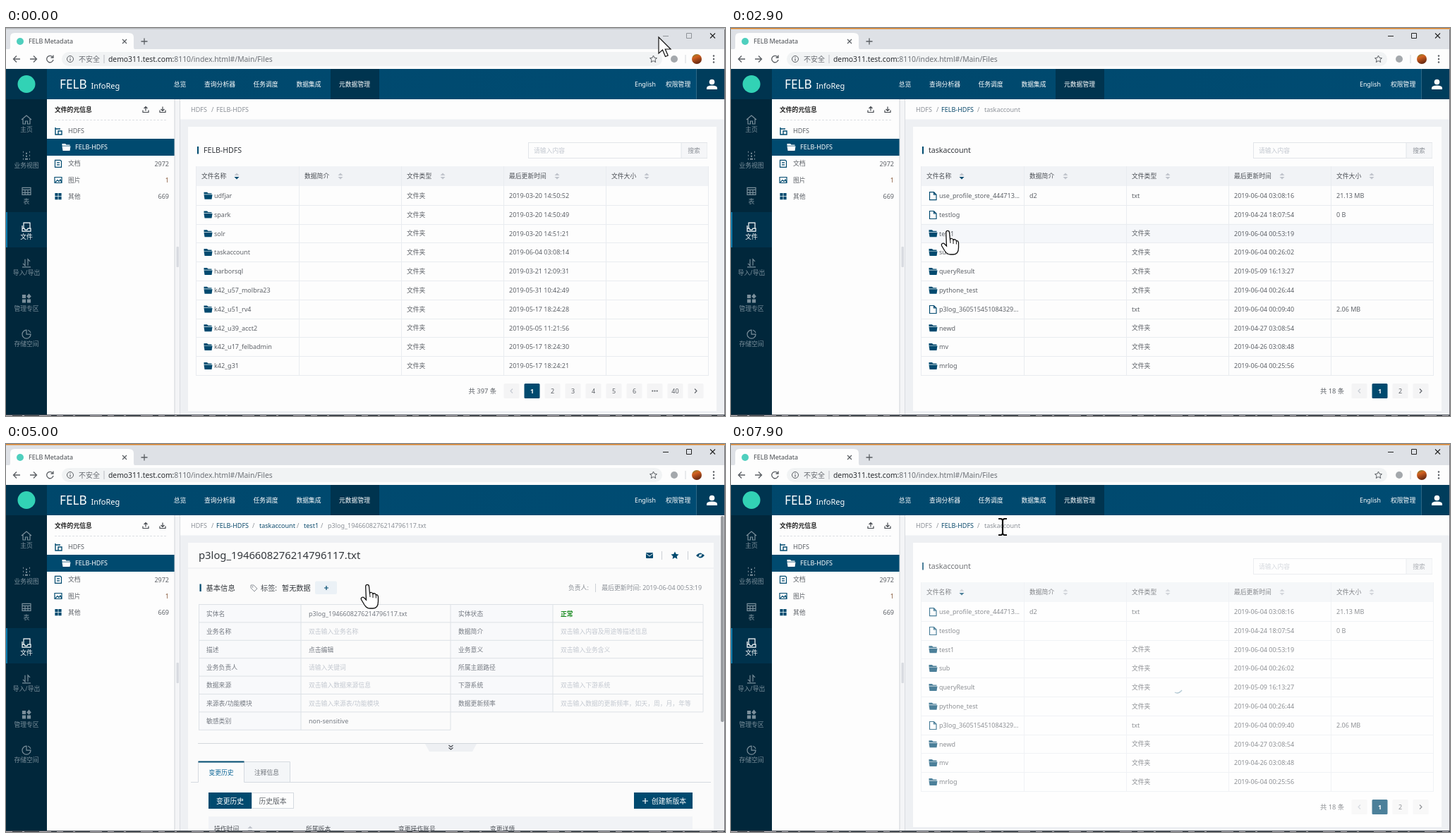
These frames come from a looping animation (1019x550 px, 8 s). An HTML page:

```html
<!DOCTYPE html>
<html lang="zh-CN">
<head>
<meta charset="utf-8">
<title>File metadata browser</title>
<style>
html, body { margin: 0; width: 100%; height: 100%; overflow: hidden; background: #fff; }
svg { display: block; width: 1019px; height: 550px; }
text { font-family: "Noto Sans", "Noto Sans CJK SC", "Noto Sans CJK", sans-serif; white-space: pre; }
</style>
</head>
<body>
<svg id="stage" viewBox="0 0 1019 550"></svg>
<script>
const NAVY = '#004a6f', INK = '#5d6167', GREY = '#8b9097', PALE = '#c3c8d0', LINE = '#e9ecf0', PAPER = '#fdfdfd', CARD = '#fbfbfb';
const FILE = 'p3log_1946608276214796117.txt';

// Drawing helpers: every text is placed by its vertical centre.
const rect = (x, y, w, h, fill, extra = '') => `<rect x="${x}" y="${y}" width="${w}" height="${h}" fill="${fill}" ${extra}/>`;
const path = (d, stroke, width = 1, fill = 'none', extra = '') =>
  `<path d="${d}" stroke="${stroke}" stroke-width="${width}" fill="${fill}" ${extra}/>`;
const solid = (d, fill) => `<path d="${d}" fill="${fill}"/>`;
const disc = (x, y, r, fill) => `<circle cx="${x}" cy="${y}" r="${r}" fill="${fill}"/>`;
const at = (x, y, body) => `<g transform="translate(${x} ${y})">${body}</g>`;
const text = (x, cy, str, fill = INK, { size, anchor = 'start', weight = 400, id = '' } = {}) => {
  const s = size || (/[\u4e00-\u9fff]/.test(str) ? 8.8 : 9);
  return `<text ${id && `id="${id}"`} x="${x}" y="${cy + s * 0.36}" font-size="${s}" fill="${fill}" text-anchor="${anchor}" font-weight="${weight}">${str}</text>`;
};
const mid = (x, cy, str, fill, opts) => text(x, cy, str, fill, { anchor: 'middle', ...opts });

const folder = (x, y, fill) => at(x, y, solid('M0-5H4.5L6-3.5H11V-2.2H0ZM0-1.5H12L11 5H1Z', fill));
const page = (x, y) => at(x, y, path('M.5-5H6.5L10-1.500V6H.5ZM6.5-5V-1.500H10', NAVY, 1.2));
const sorter = (x, y, active) => at(x, y,
  solid('M-3.5-1L0-4.5L3.5-1Z', '#c0c4cc') + solid('M-3.5 1L0 4.5L3.5 1Z', active ? NAVY : '#c0c4cc'));

function browser() {
  const dark = '#5a5e63';
  return rect(0, 0, 1019, 31, '#dee1e6')
    + solid('M2 31Q6 31 6 27V13Q6 7 12 7H174Q181 7 181 13V27Q181 31 185 31Z', PAPER)
    + disc(20, 19, 5, '#4fcfbe') + text(32, 19, 'FELB Metadata', '#45494e')
    + path('M165 16L171 22M171 16L165 22', dark, 1.2) + path('M191.500 19H200.500M196 14.500V23.500', dark, 1.3)
    + rect(0, 30, 1019, 28, PAPER)
    + path('M20 44H11M15 39.500L10.500 44L15 48.500', dark, 1.3)
    + path('M34 44H43M39 39.500L43.500 44L39 48.500', dark, 1.3)
    + path('M66 41A4.700 4.700 0 1 0 67 45M67 38.500V42H63.500', dark, 1.3)
    + rect(79, 34, 851, 20, '#f1f3f4', 'rx="10"')
    + `<circle cx="91" cy="44" r="4.5" fill="none" stroke="${dark}"/>` + path('M91 43.500V46.500M91 41.300V42.300', dark, 1.2)
    + text(103, 44, '不安全', '#666a70', { size: 10 }) + rect(138.500, 38, 1, 12, '#b9bdc2')
    + text(145, 44, 'demo311.test.com:<tspan fill="#6c7076">8110/index.html#/Main/Files</tspan>', '#2b2e32', { size: 10.35 })
    + at(917.500, 44, path('M0-5L1.500-1.700L5-1.300L2.400 1L3.200 4.500L0 2.600L-3.200 4.500L-2.400 1L-5-1.300L-1.500-1.700Z', dark))
    + disc(947, 44, 5, '#a4a8ac') + rect(962.500, 38, 1, 12, '#d4d7db')
    + disc(979, 44, 7, 'url(#avatar)') + [39.5, 44, 48.5].map(y => disc(1003, y, 1.2, dark)).join('')
    + `<g id="controls">${path('M931 11.500H939M964.500 7.500H971.500V14.500H964.500Z', 'currentColor')}</g>`
    + path('M998 7.500L1005 14.500M1005 7.500L998 14.500', '#222', 1.1)
    + '<rect id="edge" width="1019" height="1.5"/>';
}

function header() {
  const nav = [[246.5, '总览'], [303, '查询分析器'], [368, '任务调度'], [429, '数据集成'], [494, '元数据管理']];
  return rect(0, 58, 1019, 43, 'url(#bar)') + rect(0, 58, 58, 43, '#00344f') + rect(460, 58, 69, 43, '#00344f')
    + disc(29, 79.5, 12.5, '#32d2b5')
    + text(76, 79.5, 'FELB', '#fff', { size: 17.2 }) + text(120.5, 82, 'InfoReg', '#fff', { size: 11 })
    + nav.map(([x, s]) => mid(x, 80, s, '#fff', { weight: 500 })).join('')
    + text(891, 80, 'English', '#fff', { size: 8.8 }) + text(935, 80, '权限管理', '#fff', { weight: 500 })
    + rect(978, 58, 41, 43, '#003d5c') + rect(978, 58, 1, 43, '#2c6887')
    + disc(1000.500, 76.500, 3.800, '#fff') + solid('M993 87V85Q993 81.500 1000.500 81.500T1008 85V87Z', '#fff');
}

function sidebar() {
  const items = [
    ['主页', 'M-7 0L0-6L7 0M-5-1V6H-1.500V2H1.500V6H5V-1'],
    ['业务视图', 'M-5-5H-4M4-5H5M-1-3H1M-5 0H-4M4 0H5M-1 1H1M-5 5H-4M4 5H5M-2 5H2'],
    ['表', 'M-6-5H6V5H-6ZM-6-2H6M-6 2H6M-2-2V5M2-2V5'],
    ['文件', 'M-4 2V-6H5V2M-6-2V6H6V2H2L1 4H-2L-3 2H-6'],
    ['导入/导出', 'M-2-5V4L-5 1M2 4V-5L5-2M-6 6H6'],
    ['管理专区', 'M-5.500-5H-1.500V-1H-5.500ZM-5.500 1.500H-1.500V5.500H-5.500ZM1.500 1.500H5.500V5.500H1.500ZM3.500-6L6-3L3.500-.500L1-3Z'],
    ['存储空间', 'M0-6A6 6 0 1 0 6 0H0ZM2-6A6 6 0 0 1 6-2']
  ];
  return rect(0, 101, 58, 447, '#01273b') + rect(0, 261, 58, 50, '#00324c') + rect(0, 261, 2, 50, '#0a76a8')
    + items.map(([name, icon], i) => {
      const color = i === 3 ? '#fff' : '#7b8f9b', y = 130 + i * 50.7;
      return at(29, y, path(icon, color, i === 1 ? 2 : 1.2, i === 5 ? color : 'none')) + mid(29, y + 14, name, color);
    }).join('');
}

function tree() {
  const kinds = [
    ['文档', '2972', 'M-4.500-5H3L4.500-3.500V5H-4.500ZM-2-1.500H2M-2 1.500H2'],
    ['图片', '1', 'M-5-4H5V4H-5ZM-4 3L-1 0L1 2L3-.500L4.500 3'],
    ['其他', '669', 'M-4-4H-1V-1H-4ZM1-4H4V-1H1ZM-4 1H-1V4H-4ZM1 1H4V4H1Z']
  ];
  return rect(58, 101, 181, 447, PAPER) + text(69, 116, '文件的元信息', '#222', { weight: 700 })
    + at(198, 115.500, path('M-4 1V4H4V1M0 2V-4M-2.500-1.500L0-4L2.500-1.500', '#44484e', 1.200))
    + at(222, 115.500, path('M-4 1V4H4V1M0-4V2M-2.500-.500L0 2L2.500-.500', '#44484e', 1.200))
    + path('M69 130.500H228', '#dcdfe3', 1, 'none', 'stroke-dasharray="3 2"')
    + at(74, 146, path('M-4-5V5H5V0H0V5M-4-3H3', NAVY, 1.4)) + text(88, 146, 'HDFS')
    + rect(58, 157, 181, 24, NAVY) + folder(79.5, 169, '#fff') + text(98, 169, 'FELB-HDFS', '#fff', { weight: 500 })
    + kinds.map(([name, count, icon], i) => {
      const y = 192.3 + i * 23.2;
      return at(74, y, path(icon, NAVY, 1.2, i === 2 ? NAVY : 'none')) + text(88, y, name)
        + text(231, y, count, i === 1 ? '#86583a' : INK, { anchor: 'end' });
    }).join('')
    + rect(239, 101, 8, 447, '#f4f5f7') + rect(238.500, 101, 1, 447, '#cfd3d8') + rect(246, 101, 1, 447, '#d9dce0')
    + rect(241.5, 310, 3.5, 29, '#d8dbe0', 'rx="1"');
}

function crumbs(names) {
  const xs = [262, 298, 359, 422, 456];
  return rect(247, 101, 771, 28.500, PAPER) + names.map((name, i) =>
    text(xs[i], 116, name, i && i < names.length - 1 ? '#0b4a6c' : GREY)
    + (i ? text([0, 291, 349, 412, 446][i], 116, '/', GREY) : '')).join('');
}

const COLUMNS = [269.5, 415.5, 560.5, 705.5, 850.5, 995.5], TOP = 224, ROW = 26.8;

// '<' and '>' are drawn as chevrons, a bar of dots stands for skipped pages.
function pager(total, labels, cy, id) {
  const first = 967 - (labels.length - 1) * 29;
  const glyph = (label, x) => ({
    '<': at(x, cy, path('M1.500-3L-1.500 0L1.500 3', PALE, 1.1)),
    '>': at(x, cy, path('M-1.500-3L1.500 0L-1.500 3', labels.length > 3 ? INK : PALE, 1.1)),
    '...': [-3.2, 0, 3.2].map(dx => disc(x + dx, cy, 1.1, INK)).join('')
  })[label] || mid(x, cy, label, label === '1' ? '#fff' : INK, { weight: label === '1' ? 700 : 400 });
  return text(first - 11, cy, `共 ${total} 条`, INK, { size: 9.3, anchor: 'end', id })
    + labels.map((label, i) => {
      const x = first + i * 29;
      return rect(x - 0.5, cy - 10.5, 22, 21, label === '1' ? NAVY : '#f4f4f5', 'rx="1.5"') + glyph(label, x + 10.5);
    }).join('');
}

// Row: [name, time, type, size, note]; the type defaults to a folder.
function list(id, { names, rows, total, pages, countId, cardEnd, border = LINE, card = PAPER }) {
  const heads = [['文件名称', 277, 327], ['数据简介', 423, 474], ['文件类型', 568, 619], ['最后更新时间', 713, 781], ['文件大小', 858, 908]];
  const end = TOP + ROW * rows.length;
  const grid = COLUMNS.map(x => `M${x} 196V${end}`).join('')
    + rows.map((_, i) => `M269 ${Math.round(TOP + ROW * (i + 1)) + 0.5}H996`).join('');
  return `<g id="${id}">` + crumbs(names) + rect(258, 140, 749, cardEnd - 140, card)
    + rect(271, 168, 2, 10.500, NAVY) + text(280, 173, names[names.length - 1], '#33373c', { size: 10.6 })
    + rect(740.5, 162.5, 253, 22, card, 'stroke="#e2e5e9"') + rect(957, 163, 36.5, 21, '#f5f6f8') + rect(956.5, 162.5, 1, 22, '#e2e5e9')
    + text(748, 173.500, '请输入内容', PALE) + mid(975, 173.500, '搜索', GREY)
    + rect(269, 196, 727, 28, '#f1f3f6')
    + `<rect class="hover" x="269" width="727" height="${ROW}" fill="#f5f7fa"/>`
    + path(grid, border)
    + heads.map(([s, x, sx], i) => text(x, 210, s, '#4c5056', { weight: 500 }) + sorter(sx, 210, !i)).join('')
    + rows.map(([name, time, type = '文件夹', size = '', note = ''], i) => {
      const y = TOP + ROW * i + 13.7;
      return (type === '文件夹' ? folder(280.500, y, NAVY) : page(281, y)) + text(295, y, name)
        + text(423, y, note) + text(568, y, type) + text(713, y, time) + text(858, y, size);
    }).join('')
    + pager(total, pages, rows.length > 2 ? 514.5 : 300, countId) + '</g>';
}

function detail() {
  const fields = [
    ['实体名', FILE, '实体状态', '正常'],
    ['业务名称', '双击输入业务名称', '数据简介', '双击输入内容及用途等描述信息'],
    ['描述', '点击编辑', '业务意义', '双击输入业务含义'],
    ['业务负责人', '请输入关键词', '所属主题路径', ''],
    ['数据来源', '双击输入数据来源信息', '下游系统', '双击输入下游系统'],
    ['来源表/功能模块', '双击输入来源表/功能模块', '数据更新频率', '双击输入数据的更新频率，如天，周，月，年等'],
    ['敏感类别', 'non-sensitive']
  ];
  const xs = [284, 429, 641, 786], step = 25.4, y0 = 227.5;
  const tone = s => s === '正常' ? '#15881c' : /^(双击|请输入)/.test(s) ? PALE : '#757a82';
  const cell = (s, c, r) => text(xs[c], y0 + step * (r + 0.52), s, tone(s), { weight: s === '正常' ? 700 : 400 });
  const lines = fields.map((_, r) => `M273 ${y0 + step * r}H988`).join('')
    + `M273 ${y0 + step * 7}H630M273.500 ${y0}V${y0 + step * 7}M418 ${y0}V${y0 + step * 7}M630 ${y0}V${y0 + step * 7}`
    + `M775 ${y0}V${y0 + step * 6}M988 ${y0}V${y0 + step * 6}`;
  return '<g id="detail">' + crumbs(['HDFS', 'FELB-HDFS', 'taskaccount', 'test1', FILE])
    + rect(258, 140, 745, 408, CARD) + text(273, 158, FILE, '#33373c', { size: 14.8 }) + rect(258, 175.5, 745, 1, LINE)
    + at(912, 158, rect(-5, -4, 10, 8, NAVY, 'rx="1"') + path('M-4.500-2.500L0 1L4.500-2.500', '#fff'))
    + at(948, 158, solid('M0-5.500L1.700-1.900L5.500-1.500L2.700 1.200L3.400 5L0 3.100L-3.400 5L-2.700 1.200L-5.500-1.500L-1.700-1.900Z', NAVY))
    + at(984, 158, solid('M-6 0Q0-7 6 0Q0 7-6 0Z', NAVY) + disc(0, 0, 1.8, '#fff') + path('M-5 4L5-4', '#fff'))
    + rect(929, 152, 1, 12, '#ccd1d6') + rect(966, 152, 1, 12, '#ccd1d6')
    + rect(274.500, 198.500, 2.200, 10.500, NAVY) + text(283.500, 204, '基本信息', '#33373c', { size: 10.3, weight: 500 })
    + at(351, 204, path('M-4-4H0L5 1L1 5L-4 0Z', GREY) + disc(-1.500, -1.500, 0.9, GREY))
    + text(361, 204, '标签:', '#4c5056', { size: 10.2 }) + text(391, 204, '暂无数据', '#33373c', { size: 10.2 })
    + rect(438, 194.5, 31, 18.5, '#ebf1f6', 'rx="2"') + path('M451 204H457M454 201V207', NAVY, 1.2)
    + text(797, 204, '负责人:', GREY) + rect(835, 198, 1, 12, '#ccd1d6')
    + text(986, 204, '最后更新时间: 2019-06-04 00:53:19', GREY, { anchor: 'end', size: 8.9 })
    + rect(273, y0, 145, step * 7, '#f8f9fb') + rect(630, y0, 145, step * 6, '#f8f9fb')
    + path(lines, '#dde1e6') + fields.map((row, r) => row.map((s, c) => cell(s, c, r)).join('')).join('')
    + path('M272 424.500H988', '#d3d7dc') + solid('M594 425H667L661 436H600Z', '#eef0f3')
    + path('M627.500 427L630.500 429.500L633.500 427M627.500 430.500L630.500 433L633.500 430.500', '#44484e', 1.100)
    + rect(337, 450, 65, 29, '#f4f6f8') + path('M262 479.500H272.500V450M337.500 450V479.500H999M337.500 450.500H402.500V479', '#d5dae0')
    + rect(272.5, 449.5, 65, 2, NAVY) + mid(305, 465.5, '变更历史', '#0b6596') + mid(369.5, 465.5, '注释信息', '#6c7178')
    + rect(287, 494, 61, 23, NAVY) + mid(317.5, 506, '变更历史', '#fff', { size: 9.8 })
    + rect(348.5, 494.5, 59, 22, PAPER, 'stroke="#d5dae0"') + mid(378, 506, '历史版本', INK, { size: 9.8 })
    + rect(890, 494, 83, 23, NAVY) + path('M902 506H910M906 502V510', '#fff', 1.2) + text(915, 506, '创建新版本', '#fff', { size: 9.8 })
    + rect(287, 528, 686, 20, '#f1f3f6') + sorter(346, 546, false)
    + [[295, '操作时间'], [425, '所属版本'], [556, '变更操作账号'], [686, '变更详情']].map(([x, s]) => text(x, 545.5, s, '#4c5056', { weight: 500 })).join('')
    + rect(1012.5, 101, 5, 447, '#f1f2f3') + rect(1013, 102, 4.500, 292, '#9a9da1', 'rx="2"') + '</g>';
}

const day = (d, time) => `2019-${d} ${time}`;
const lists = {
  root: {
    names: ['HDFS', 'FELB-HDFS'], total: 397, cardEnd: 543,
    pages: ['<', '1', '2', '3', '4', '5', '6', '...', '40', '>'],
    rows: [
      ['udfjar', day('03-20', '14:50:52')], ['spark', day('03-20', '14:50:49')], ['solr', day('03-20', '14:51:21')],
      ['taskaccount', day('06-04', '03:08:14')], ['harborsql', day('03-21', '12:09:31')],
      ['k42_u57_molbra23', day('05-31', '10:42:49')], ['k42_u51_rv4', day('05-17', '18:24:28')],
      ['k42_u39_acct2', day('05-05', '11:21:56')], ['k42_u17_felbadmin', day('05-17', '18:24:30')], ['k42_g31', day('05-17', '18:24:21')]
    ]
  },
  account: {
    names: ['HDFS', 'FELB-HDFS', 'taskaccount'], total: 18, cardEnd: 543, pages: ['<', '1', '2', '>'],
    rows: [
      ['use_profile_store_444713...', day('06-04', '03:08:16'), 'txt', '21.13 MB', 'd2'], ['testlog', day('04-24', '18:07:54'), '', '0 B'],
      ['test1', day('06-04', '00:53:19')], ['sub', day('06-04', '00:26:02')], ['queryResult', day('05-09', '16:13:27')],
      ['pythone_test', day('06-04', '00:26:44')], ['p3log_360515451084329...', day('06-04', '00:09:40'), 'txt', '2.06 MB'],
      ['newd', day('04-27', '03:08:54')], ['mv', day('04-26', '03:08:48')], ['mrlog', day('06-04', '00:25:56')]
    ]
  },
  test: {
    names: ['HDFS', 'FELB-HDFS', 'taskaccount', 'test1'], total: 2, cardEnd: 537, pages: ['<', '1', '>'], countId: 'count',
    border: '#f1f3f5', card: CARD,
    rows: [
      ['p3log_194660827621479...', day('06-04', '00:53:19'), 'txt', '2.06 MB'],
      ['japanese_log_281399509...', day('06-04', '00:19:49'), 'txt', '2.94 KB']
    ]
  }
};

const pointers = {
  arrow: path('M0 0V23L5.500 18L9.500 27.500L13.200 26L9.300 17H17Z', '#111', 1.2, '#fff'),
  hand: path('M-2.300 2C-2.300-1.500 2.300-1.500 2.500 2L3.500 11.500C5 9.500 7.500 10.500 8 12.500C9.500 11 12 12 12.400 14C14 13 15.500 14.500 15.500 17V23C15.500 29 13 33 8 33H4C0 33-2 31-4 28L-8.500 20.500C-9.500 18-6.500 16-4.500 18L-1.500 21Z', '#111', 1.3, '#fff')
    + path('M3.500 11.500L4 17M8 12.500V18M12.400 14V18.500', '#111'),
  beam: path('M-6-11H-2L0-9.500L2-11H6M0-10V11M-6 12H-2L0 10.500L2 12H6', '#111', 2.2)
};

document.getElementById('stage').innerHTML = `<defs>
  <linearGradient id="bar"><stop stop-color="#00476b"/><stop offset="1" stop-color="#004c73"/></linearGradient>
  <linearGradient id="avatar" y2="1" x2=".4"><stop stop-color="#6d8a35"/><stop offset=".4" stop-color="#d2601f"/><stop offset="1" stop-color="#6b2a12"/></linearGradient>
  </defs>` + rect(247, 101, 772, 447, '#eef0f3')
  + Object.keys(lists).map(id => list(id, lists[id])).join('') + detail()
  + rect(258, 140, 749, 403, '#fff', 'id="mask"') + path('M-5 2Q0 5 5-1', '#7fa5b7', 1.4, 'none', 'id="spinner"')
  + tree() + sidebar() + header() + browser()
  + rect(0, 548, 1019, 2, '#454b52') + path('M0 549.500H1019', '#b8b4bb', 1, 'none', 'stroke-dasharray="9 14 3 21 17 8"')
  + rect(1018, 2, 1, 546, '#77757b')
  + Object.keys(pointers).map(id => `<g id="${id}">${pointers[id]}</g>`).join('');

const $ = id => document.getElementById(id);
const show = (el, on) => { el.style.display = on ? '' : 'none'; };

const scenes = [[0, 'root'], [1200, 'account'], [3000, 'test'], [5000, 'detail'], [6800, 'test'], [7700, 'account']];
const route = [
  [0, 925, 13], [100, 900, 24], [500, 560, 190], [900, 345, 304], [1100, 325, 316], [1500, 325, 316], [1800, 325, 286],
  [2000, 313, 280], [2200, 307, 288], [2900, 307, 288], [3300, 329, 269], [3800, 336, 237], [4700, 336, 237],
  [5000, 512, 200], [5300, 550, 172], [5500, 530, 155], [5600, 526, 150], [6300, 441, 118], [6800, 441, 118],
  [7200, 385, 117], [8000, 385, 117]
];
const shapes = [[0, 'arrow'], [800, 'hand'], [5100, 'arrow'], [6100, 'hand'], [6800, 'beam'], [7000, 'hand'], [7700, 'beam']];
const latest = (track, t) => track.filter(([start]) => start <= t).pop();

function position(t) {
  const i = route.findIndex(([time]) => time > t), [t0, x0, y0] = route[i - 1], [t1, x1, y1] = route[i];
  const k = (t - t0) / (t1 - t0);
  return [x0 + (x1 - x0) * k, y0 + (y1 - y0) * k];
}

function draw(now) {
  const t = Math.floor(now % 8000 / 100) * 100;
  const [start, scene] = latest(scenes, t), [, shape] = latest(shapes, t), [x, y] = position(t);
  [...Object.keys(lists), 'detail'].forEach(id => show($(id), id === scene));
  Object.keys(pointers).forEach(id => show($(id), id === shape));
  $(shape).setAttribute('transform', `translate(${x} ${y})`);

  if (lists[scene]) {
    const row = Math.floor((y - TOP) / ROW), hover = $(scene).querySelector('.hover');
    show(hover, row >= 0 && row < lists[scene].rows.length && x > 269 && x < 996);
    hover.setAttribute('y', TOP + row * ROW);
  }
  $('count').textContent = `共 ${start === 6800 && t < 7000 ? 0 : 2} 条`;

  const loading = ['account', 'test'].includes(scene) && start !== 6800 ? Math.max(0, 0.9 - (t - start) / 333) : 0;
  $('mask').setAttribute('opacity', loading);
  $('spinner').setAttribute('opacity', loading > 0.02 ? 0.6 : 0);
  $('spinner').setAttribute('transform', `translate(634 350) rotate(${(t - start - 200) * 0.5})`);

  const focused = t >= 100;
  $('controls').style.color = focused ? '#222' : '#8f9398';
  $('edge').setAttribute('fill', focused ? '#d9832b' : '#b5b8bc');
}

function loop() {
  draw(performance.now());
  requestAnimationFrame(loop);
}
loop();
</script>
</body>
</html>
```
